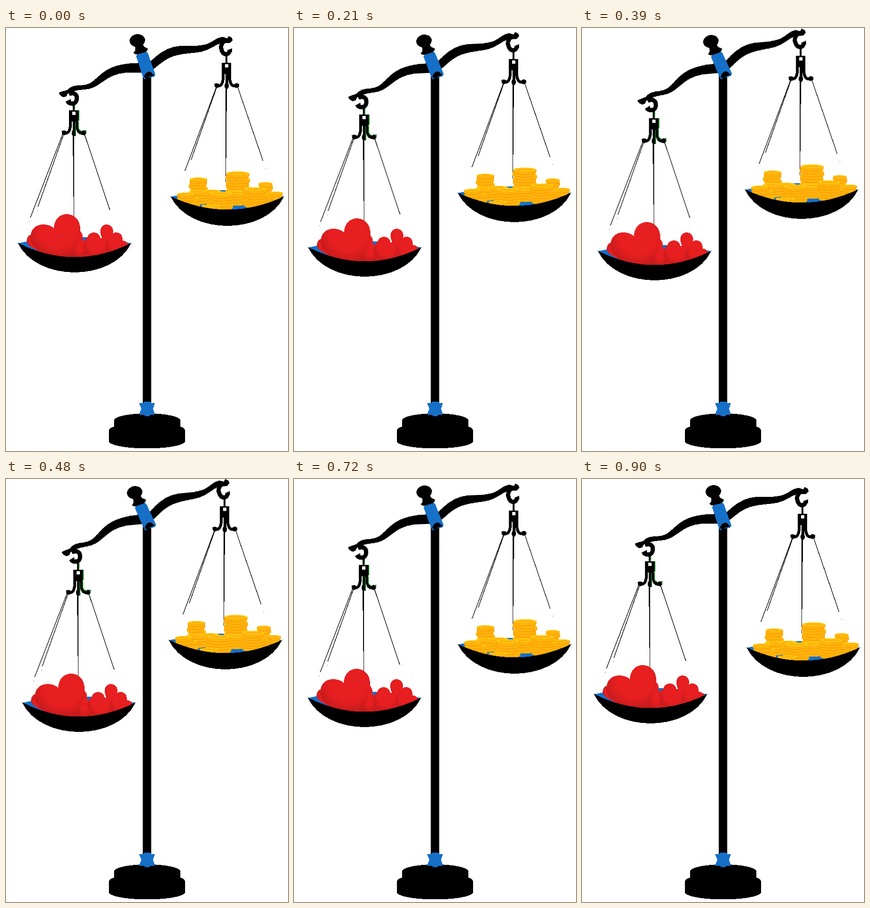
Animation of 600x900 px, one loop 930 ms. Source, as an HTML page:

```html
<!DOCTYPE html>
<html lang="en">
<head>
<meta charset="utf-8">
<title>Balance scale</title>
<style>
  html, body { margin: 0; width: 100%; height: 100%; overflow: hidden; background: #fff; }
  svg { display: block; width: 600px; height: 900px; shape-rendering: crispEdges; }
  .blue { fill: #1670c8; }
  .line { fill: none; stroke: #000; }
  .beam, .left, .right { animation: 930ms steps(15, end) infinite; }
  .beam { transform-origin: 298px 86px; animation-name: tilt; }
  .left { animation-name: sink; }
  .right { animation-name: lift; }
  @keyframes tilt {
    0%, 96.77%, 100% { transform: rotate(0deg); }
    48.38% { transform: rotate(-6deg); }
  }
  @keyframes sink {
    0%, 96.77%, 100% { transform: translate(0, 0); }
    48.38% { transform: translate(9.8px, 19.4px); }
  }
  @keyframes lift {
    0%, 96.77%, 100% { transform: translate(0, 0); }
    48.38% { transform: translate(-4.4px, -17.1px); }
  }
</style>
</head>
<body>
<svg viewBox="0 0 600 900">
  <defs>
    <radialGradient id="red" cx=".56" cy=".36" r=".68">
      <stop offset=".55" stop-color="#e71f20"/>
      <stop offset="1" stop-color="#bd1a1c"/>
    </radialGradient>
    <g id="hanger">
      <path class="line" stroke-width="4" d="M469 56V76"/>
      <path fill-rule="evenodd" d="M459 74H479V98H459ZM465.500 77V84H472.500V77Z"/>
      <path class="line" stroke-width="6" d="M462 94V107Q461 121 454 123Q448 125 446 118M476 94V107Q477 121 484 123Q490 125 493 118"/>
      <path class="line" stroke-width="6" d="M469.500 92V128"/>
      <ellipse cx="469.500" cy="123" rx="4.500" ry="7"/>
      <ellipse cx="449" cy="122.500" rx="5.500" ry="5"/>
      <ellipse cx="490.500" cy="122.500" rx="5.500" ry="5"/>
    </g>
  </defs>

  <rect x="291" y="98" width="18" height="704"/>
  <path d="M230 835A70.500 15 0 0 1 371 835V848Q381 851 381 857V879A81 15.500 0 0 1 219 879V857Q219 851 230 848Z"/>
  <path class="blue" d="M283 798L291 798L294 795H306L309 798L317 798L313 810L317 823L307 823L304 826H296L293 823L283 823L288 810Z"/>

  <g class="left">
    <path class="line" stroke-width="1.300" d="M120.500 226L52 403M122.500 227L68 380M167 226L221 387"/>
    <path class="line" stroke-width="1" d="M49 411.500H50M66 388.500H67"/>
    <path d="M142 228H145L145 402H144Z"/>
    <use href="#hanger" x="-325" y="100.500"/>
    <path fill="none" stroke="#07700f" stroke-width="2" d="M146 160V173M154.500 175V197M154 200V212Q155 219 162 220M170 217V225M147.500 200V230"/>
    <path class="blue" d="M26 458Q146 430 266 458Q146 518 26 458Z"/>
    <path fill="#d21c1e" d="M60 466L150 462L262 463L240 482L146 492L80 484Z"/>
    <g fill="url(#red)">
      <path d="M44 453C44 443 51 438 60 438L80 480L62 471C52 466 44 460 44 453Z"/>
      <path d="M140 490L148 428C158 429 165 438 163 449C172 458 172 476 166 492Z"/>
      <path d="M201 436C199 426 206 418 214 418C222 418 228 424 228 432C228 444 221 458 209 466Z"/>
      <path d="M232 455Q250 448 259 458L262 466L232 482Z"/>
      <path d="M193 490C178 488 163 475 165 460C166 451 171 447 173 447C174 439 180 435 187 435C194 435 200 440 201 447C209 447 214 454 214 462C214 474 205 486 193 490Z"/>
      <path d="M228 485C218 478 211 468 213 457C214 449 218 446 222 446C223 438 229 435 235 435C243 435 248 441 248 449C249 464 240 478 228 485Z"/>
      <path d="M136 491C105 490 52 477 52 446C52 427 65 418 79 418C90 418 98 422 102 426C102 408 114 396 129 396C146 396 158 409 158 428C158 452 147 475 136 491Z"/>
    </g>
    <path d="M25 457Q146 518 267 457C227 541 65 541 25 457Z"/>
  </g>

  <g class="right">
    <path class="line" stroke-width="1.300" d="M447.500 126L381 303M448 127L394 280M493 126L547 283"/>
    <path class="line" stroke-width="1" d="M380 303.500H381M552 298.500H553"/>
    <path d="M467 128H470L468 328H467Z"/>
    <use href="#hanger"/>
    <path class="blue" d="M351 359Q471 331 591 359Q471 414 351 359Z"/>
    <g id="coins"></g>
    <path d="M350 358Q471 415 592 358C552 442 390 442 350 358Z"/>
  </g>

  <g class="beam">
    <path d="M300 75C270 73 245 76 225 84C198 95 188 118 168 121C154 123 144 121 136 127L130 132L113 137L114 142L121 147L128 146L131 140C142 134 152 132 166 131C195 130 207 108 232 100C255 92 275 95 300 96Z"/>
    <path d="M298 80C310 69 324 53 345 44C372 33 395 41 420 36C440 32 446 20 461 19L471 22L474 17L481 21L482 27L476 32L458 32C444 36 434 47 414 51C390 55 362 53 338 69C324 78 315 88 305 94Z"/>
    <path class="line" stroke-width="9" d="M134 140C148 136 152 144 150.500 152C148 163 139 163 131 157"/>
    <path d="M126 157L138 151L137 165Z"/>
    <path class="line" stroke-width="9" d="M470 25C459 30 456 38 458.500 46C462 59 474 59 476.500 47"/>
    <path d="M470 48L481 43L481 51Z"/>
    <ellipse cx="279.500" cy="26.500" rx="16.500" ry="13.500" transform="rotate(-8 280 27)"/>
    <path d="M274 36L291 34Q293 41 302 44Q301 52 288 55Q276 58 271 53Q278 48 274 36Z"/>
    <path class="blue" d="M277 60L279 56L299 51L302 54L318 99L315 104L298 106L295 110L292 107Z"/>
    <path d="M293 105Q296 94 304 93Q311 93 315 102Q305 102 300 107Z"/>
  </g>
</svg>
<script>
  // Stacks from back to front: centre x, top y, radius, number of coins
  const stacks = [
    [493, 305, 24, 7], [409, 318, 18, 4], [552, 328, 14, 4], [438, 344, 19, 4],
    [493, 346, 23, 4], [408, 345, 19, 4], [556, 350, 18, 3], [574, 348, 14, 2],
    [392, 358, 19, 3], [382, 350, 18, 2], [530, 339, 24, 6], [457, 348, 24, 6],
    [436, 375, 20, 2]
  ];
  const thick = 6;

  function coin(x, y, r) {
    const ry = r * 0.17;
    const arc = `a${r} ${ry} 0 0 0 ${2 * r} 0`;
    return `<path d="M${x - r} ${y}v${thick}${arc}v${-thick}z" fill="#ffab08" stroke="#f39a00" stroke-width=".7"/>
      <path d="M${x - r} ${y + thick / 2 + 0.5}${arc}" fill="none" stroke="#ffc81a" stroke-width="3" stroke-dasharray="1.3 2.4"/>
      <ellipse cx="${x}" cy="${y}" rx="${r}" ry="${ry}" fill="#ffd014"/>
      <ellipse cx="${x}" cy="${y}" rx="${r * 0.8}" ry="${ry * 0.6}" fill="#ffb30a"/>`;
  }

  let coins = "";
  for (const [x, top, r, count] of stacks) {
    for (let i = count - 1; i >= 0; i--) {
      const shift = i ? 2 * Math.sin(i * 2.3 + x) : 0;
      coins += coin(x + shift, top + r * 0.17 + i * thick, r);
    }
  }
  document.getElementById("coins").innerHTML = coins;
</script>
</body>
</html>
```
